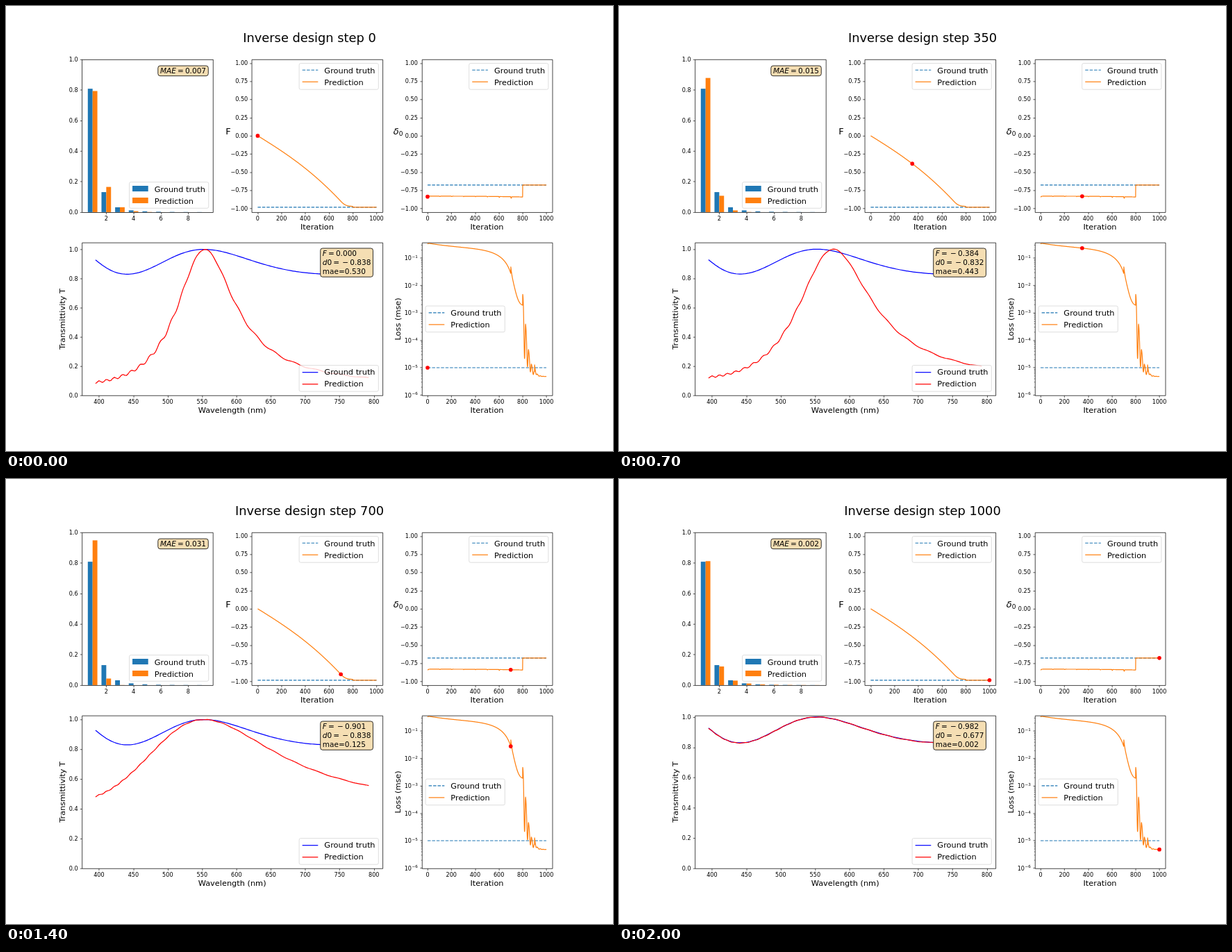
An HTML page with a canvas that plays this animation: 874 px wide and 641 px high, repeating every 2.1 s.

```html
<!DOCTYPE html>
<html lang="en">
<head>
<meta charset="utf-8">
<title>Inverse design</title>
<style>
html, body { margin: 0; width: 100%; height: 100%; overflow: hidden; background: #fff; }
canvas { display: block; }
</style>
</head>
<body>
<canvas id="stage" width="874" height="641"></canvas>
<script>
const ctx = document.getElementById('stage').getContext('2d');
const BLUE = '#1f77b4', ORANGE = '#ff7f0e', WHEAT = '#f5deb3';
const TRUE_F = -0.982, TRUE_D0 = -0.677, TRUE_LOSS = -5.005;

const range = (a, b, step = 1) =>
  Array.from({ length: Math.floor((b - a) / step + 1.001) }, (_, i) => a + i * step);
const snap = v => Math.round(v) + .5;
const signed = (v, n) => v.toFixed(n).replace('-', '−');
const mean = list => list.reduce((a, b) => a + b, 0) / list.length;

// Nine bars: a first one, then a falling tail
const bars = (first, tail) => range(1, 9).map(n => n > 1 ? tail(n) : first);
const powerTail = second => n => second * (2 / n) ** 3.5;
const trueBars = bars(.808, powerTail(.131));

// Small disturbance shortly after every hundredth iteration
const notch = s => (.005 + .13 * (s / 1000) ** 6) * Math.exp(-(((s % 100 - 4) / 3) ** 2));

// The optimiser's state: slow descent, then a jump onto the solution after 800
function state(s) {
  const t = s / 1000, restart = s > 700 && s % 200 > 100;
  const kick = restart ? .25 * Math.exp((1 - s % 100) / 8) : 0;

  if (s > 800) {
    const x = s - 801, phase = x / 24.5 % 1;
    const ring = .64 + .36 * Math.cos(2 * Math.PI * phase ** 1.5);
    return {
      f: TRUE_F, d0: TRUE_D0, error: .002, peak: 553, rate: 3422,
      loss: -5.33 + 3 * Math.exp(-((x / 45) ** 1.3)) * ring + kick,
      bars: bars(.812, powerTail(.122))
    };
  }

  const late = (s - 700) / 41, warm = Math.exp(-s / 5);
  const x = s > 700 ? .9709 - .0699 * Math.exp(-late - .4 * late * late)
    : t * (1.0144 + .0254 * t + .6844 * t ** 2 - .2346 * t ** 3);
  const d0 = -.831 - .007 * warm - .0213 * t ** 3;
  const error = .552 - .4595 * x + .808 * x ** 2 - .9151 * x ** 3 - .022 * warm;
  const second = Math.max(.155 - .125 * x, .043) + .01 * warm;
  const ratio = .17 * (1 - x) + .024 * warm;
  return {
    f: -x, d0, error,
    peak: 554 + 3700 * (d0 + .838),
    rate: 1820 - 120 * warm,
    loss: Math.log10(error ** 2 * (1.15 + .95 * x ** 4)) + kick,
    bars: bars(Math.min(.817 + .16 * x, .948) - .024 * warm, n => second * ratio ** (n - 2))
  };
}

const steps = range(0, 1000);
const history = steps.map(state);
const fCurve = steps.map(s => [s, history[s].f]);
const dCurve = steps.map(s => [s, history[s].d0 - (s < 800 ? notch(s) : 0)]);
const lossCurve = steps.map(s => [s, history[s].loss]);

function text(s, x, y, size, align = 'left', style = '') {
  ctx.font = `${style} ${size}px "DejaVu Sans", sans-serif`;
  ctx.textAlign = align;
  ctx.fillStyle = '#000';
  ctx.fillText(s, x, y);
}

function upright(s, x, y, size) {
  ctx.save();
  ctx.translate(x, y);
  ctx.rotate(-Math.PI / 2);
  text(s, 0, 0, size, 'center');
  ctx.restore();
}

// Italic letters, upright digits, spaced operators
function math(s, x, y, size) {
  for (const c of s) {
    const gap = '=−'.includes(c) ? .2 * size : 0;
    text(c, x + gap, y, size, 'left', /[a-z]/i.test(c) ? 'italic' : '');
    x += ctx.measureText(c).width + 2 * gap;
  }
}

function line(points, color, width = 1.5, dash = []) {
  ctx.beginPath();
  points.forEach(p => ctx.lineTo(...p));
  ctx.strokeStyle = color;
  ctx.lineWidth = width;
  ctx.lineJoin = 'round';
  ctx.setLineDash(dash);
  ctx.stroke();
  ctx.setLineDash([]);
}
const dashed = (points, color) => line(points, color, 1.5, [5.55, 2.4]);

function box(x, y, w, h, r, fill, stroke) {
  ctx.beginPath();
  ctx.roundRect(x, y, w, h, r);
  ctx.fillStyle = fill;
  ctx.fill();
  ctx.strokeStyle = stroke;
  ctx.lineWidth = 1;
  ctx.stroke();
}

function dot(x, y) {
  ctx.beginPath();
  ctx.arc(x, y, 3.5, 0, 7);
  ctx.fillStyle = '#f00';
  ctx.fill();
}

class Axes {
  constructor(x, y, w, x0, x1, y0, y1) {
    Object.assign(this, { x, y, w, h: 271.8 });
    this.X = v => x + (v - x0) / (x1 - x0) * w;
    this.Y = v => y + this.h - (v - y0) / (y1 - y0) * this.h;
  }
  plot(points, color, draw = line) {
    draw(points.map(([a, b]) => [this.X(a), this.Y(b)]), color);
  }
  frame() {
    const l = snap(this.x), t = snap(this.y);
    ctx.strokeStyle = '#000';
    ctx.lineWidth = .9;
    ctx.strokeRect(l, t, snap(this.x + this.w) - l, snap(this.y + this.h) - t);
  }
  xTicks(values, label) {
    const bottom = this.y + this.h, b = snap(bottom);
    for (const v of values) {
      const x = snap(this.X(v));
      line([[x, b], [x, b + 3.5]], '#000', .8);
      text(v, this.X(v), bottom + 15, 10, 'center');
    }
    if (label) text(label, this.x + this.w / 2, bottom + 31.6, 14, 'center');
  }
  yTick(v, length = 3.5) {
    const y = snap(this.Y(v)), l = snap(this.x);
    line([[l - length, y], [l, y]], '#000', length > 3 ? .8 : .6);
  }
  yTicks(values, digits) {
    for (const v of values) {
      this.yTick(v);
      text(signed(v, digits), this.x - 7, this.Y(v) + 3.65, 10, 'right');
    }
  }
  logTicks(from, to, low, high) {
    for (const e of range(from, to)) {
      this.yTick(e);
      const y = this.Y(e) + 4.2;
      text('−' + -e, this.x - 7, y - 4, 7, 'right');
      text('10', this.x - 7.6 - ctx.measureText('−' + -e).width, y, 10, 'right');
    }
    for (const e of range(from - 1, to))
      for (const k of range(2, 9)) {
        const v = e + Math.log10(k);
        if (v > low && v < high) this.yTick(v, 2);
      }
  }
}

// swatch(x, y, row) draws one legend key
function legend(x, y, swatch) {
  box(x, y, 141.15, 46.5, 2.8, 'rgba(255,255,255,.8)', 'rgba(204,204,204,.8)');
  ['Ground truth', 'Prediction'].forEach((s, i) => {
    swatch(x + 5.6, Math.round(y + 12 + 21 * i), i);
    text(s, x + 44.8, y + 17.2 + 21 * i, 14);
  });
}
const lineKey = (colors, first) => (x, y, i) =>
  (i ? line : first)([[x, y], [x + 28, y]], colors[i]);
const pathKey = lineKey([BLUE, ORANGE], dashed);

function barPanel(guess) {
  const ax = new Axes(135, 95.04, 232.5, .215, 9.785, 0, 1);
  [trueBars, guess].forEach((list, k) => {
    ctx.fillStyle = k ? ORANGE : BLUE;
    list.forEach((v, i) => {
      const x = ax.X(i + .65 + .35 * k), y = ax.Y(v);
      ctx.fillRect(x, y, ax.X(i + 1 + .35 * k) - x, ax.Y(0) - y);
    });
  });
  ax.frame();
  ax.xTicks([2, 4, 6, 8]);
  ax.yTicks(range(0, 1, .2), 1);
  legend(219.35, 313.4, (x, y, i) => {
    ctx.fillStyle = i ? ORANGE : BLUE;
    ctx.fillRect(x, y - 5, 28, 10);
  });
  box(270.4, 106.4, 89.5, 18, 3.9, WHEAT, '#000');
  const error = mean(guess.map((v, i) => Math.abs(v - trueBars[i])));
  math('MAE=' + error.toFixed(3), 274.3, 119.7, 13);
}

function historyPanel(x, path, truth, step, value) {
  const ax = new Axes(x, 95.04, 232.5, -50, 1050, -1.05, 1.05);
  ax.plot([[0, truth], [1000, truth]], BLUE, dashed);
  ax.plot(path, ORANGE);
  dot(ax.X(step), ax.Y(value));
  ax.frame();
  ax.xTicks(range(0, 1000, 200), 'Iteration');
  ax.yTicks(range(-1, 1, .25), 2);
  legend(x + 84.35, 102.04, pathKey);
}

function lossPanel(step, loss) {
  const low = -6.016, high = -.44;
  const ax = new Axes(739.5, 421.2, 232.5, -50, 1050, low, high);
  ax.plot([[0, TRUE_LOSS], [1000, TRUE_LOSS]], BLUE, dashed);
  ax.plot(lossCurve, ORANGE);
  dot(ax.X(step), ax.Y(step ? loss : TRUE_LOSS));
  ax.frame();
  ax.xTicks(range(0, 1000, 200), 'Iteration');
  ax.logTicks(-6, -1, low, high);
  upright('Loss (mse)', 701.8, 557.1, 14);
  legend(746.5, 533.85, pathKey);
}

// Resonator transmission around a peak wavelength
const airy = (nm, peak, depth, rate) =>
  1 / (1 + depth * Math.sin(rate * (1 / nm - 1 / peak)) ** 2);

function spectrumPanel({ f, d0, error, peak, rate }) {
  const waves = range(395, 792.5, 2.5);
  const truth = waves.map(nm => [nm, airy(nm, 553, .205, 3422)]);
  const guess = waves.map(nm => {
    const t = airy(nm, peak, 11.5 * (1 + f), rate);
    const ripple = .0015 + .08 * (1 + f) * t * (1 - t) * Math.exp((395 - nm) / 200);
    return [nm, t + ripple * Math.cos(96700 / nm - 2.99)];
  });
  const all = [...truth, ...guess].map(p => p[1]);
  const max = Math.max(...all), top = max + .05 * (max - Math.min(...all));

  const ax = new Axes(135, 421.2, 534.75, 375.125, 812.375, 0, top);
  ax.plot(truth, '#00f');
  ax.plot(guess, '#f00');
  ax.frame();
  ax.xTicks(range(400, 800, 50), 'Wavelength (nm)');
  ax.yTicks(range(0, 1, .2), 1);
  upright('Transmittivity T', 104.8, 557.1, 14);
  legend(521.6, 639.5, lineKey(['#00f', '#f00'], line));

  box(559.4, 431.2, 93.6, 51, 3.9, WHEAT, '#000');
  math('F=' + signed(f, 3).replace('−0.000', '0.000'), 563.3, 445.4, 13);
  math('d0=' + signed(d0, 3), 563.3, 461.4, 13);
  text('mae=' + error.toFixed(3), 563.3, 476.9, 13);
}

function draw(now) {
  const step = Math.floor(now / 100) % 21 * 50;
  const current = history[step];

  ctx.setTransform(874 / 1080, 0, 0, 641 / 792, 0, 0);
  ctx.fillStyle = '#fff';
  ctx.fillRect(0, 0, 1080, 792);
  text('Inverse design step ' + step, 540, 64.3, 22, 'center');
  barPanel(current.bars);
  historyPanel(437.25, fCurve, TRUE_F, step, current.f);
  text('F', 390.8, 228.2, 16);
  historyPanel(739.5, dCurve, TRUE_D0, step, current.d0);
  text('δ', 689.3, 228, 16, 'left', 'italic');
  text('0', 699.1, 231, 11.2);
  spectrumPanel(current);
  lossPanel(step, current.loss);
  requestAnimationFrame(draw);
}
requestAnimationFrame(draw);
</script>
</body>
</html>
```
